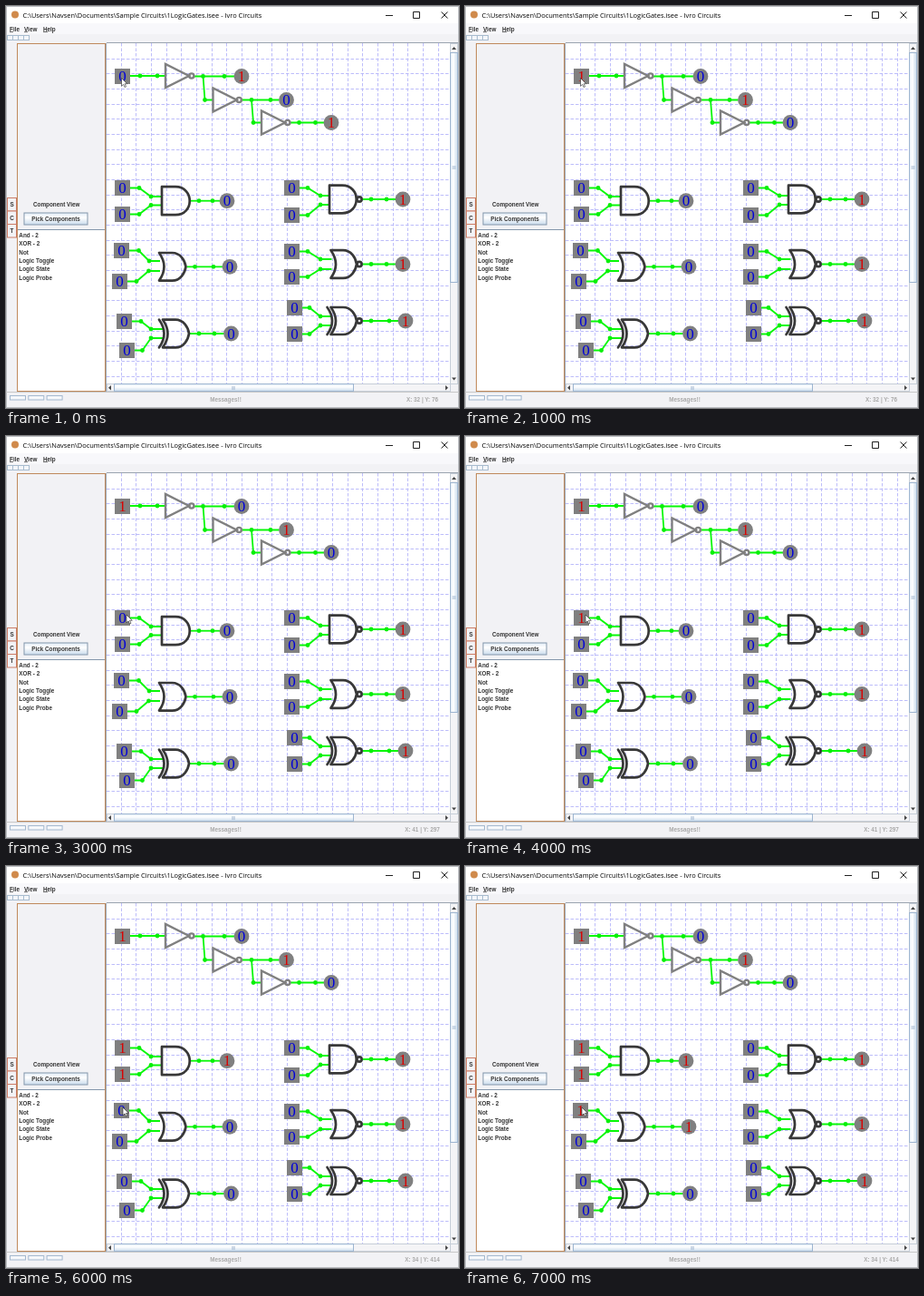
Animation of 500x443 px, one loop 8 s. Source, as an HTML page:

```html
<!DOCTYPE html>
<html lang="en">
<head>
<meta charset="utf-8">
<title>Logic gates</title>
<style>
html, body { margin: 0; width: 100%; height: 100%; overflow: hidden; background: #fff; }
svg { display: block; width: 100vw; height: 100vh; }
text { white-space: pre; }
.ui { font: bold 6.35px "Liberation Sans", Arial, sans-serif; fill: #333; }
.title { font: 7.45px "Open Sans", sans-serif; fill: #000; }
.dim { fill: #a9a9a9; text-anchor: middle; }
.mid { text-anchor: middle; }
.bit { font: 17px "Liberation Serif", "Times New Roman", serif; text-anchor: middle; }
.wire { fill: none; stroke: #08f808; stroke-width: 1.8; }
.dot { fill: #08f008; }
.gate { fill: none; stroke: #383838; stroke-width: 2.7; stroke-linejoin: round; stroke-linecap: round; }
.not { fill: none; stroke: #808080; stroke-width: 2.4; }
</style>
</head>
<body>
<svg id="stage" viewBox="0 0 500 443" preserveAspectRatio="none"></svg>
<script>
const stage = document.getElementById('stage');
const PANEL = '#f2f2f5';

function add(tag, attrs, label) {
  const el = document.createElementNS('http://www.w3.org/2000/svg', tag);
  for (const key in attrs) el.setAttribute(key, attrs[key]);
  if (label !== undefined) el.textContent = label;
  stage.appendChild(el);
  return el;
}
const rect = (x, y, width, height, fill, stroke = 'none') =>
  add('rect', { x, y, width, height, fill, stroke });
const path = (d, attrs) => add('path', { d, ...attrs });
const text = (x, y, label, cls = 'ui') => add('text', { x, y, class: cls }, label);
const dot = (x, y) => add('circle', { cx: x, cy: y, r: 2.4, class: 'dot' });
const bubble = (x, y, cls) => add('circle', { cx: x, cy: y, r: 2.6, class: cls });

// Window frame, title and menu
function drawWindow() {
  rect(0, 0, 500, 443, PANEL);
  rect(0, 0, 500, 19, '#fff');
  add('circle', { cx: 10, cy: 9.5, r: 4, fill: '#d08a4c' });
  text(18.5, 12.6, 'C:\\Users\\Navsen\\Documents\\Sample Circuits\\1LogicGates.isee - Ivro Circuits', 'title');
  path('M419 10.5h8M449.5 6.5h7v7h-7zM480.5 6.5l7 7M487.5 6.5l-7 7',
    { fill: 'none', stroke: '#222', 'stroke-width': 1 });

  rect(0, 19, 500, 12, '#f8f8fb');
  [['File', 4, 4], ['View', 20, 4], ['Help', 41, 5]].forEach(([name, x, w]) => {
    text(x, 27.6, name);
    rect(x, 28.4, w, 0.7, '#333');
  });
  for (let i = 0; i < 4; i++) rect(1.5 + i * 6, 32.5, 6, 5, '#f4f6fa', '#a8bccf');
  path('M0 .5H500M.5 0V443M499.5 0V443M0 442.5H500', { stroke: '#b9bcc0', fill: 'none' });
}

function drawSidebar() {
  ['S', 'C', 'T'].forEach((name, i) => {
    const y = 211.5 + i * 14.5;
    rect(1.5, y, 10, 14.5, PANEL, '#cc7c66');
    text(6.5, y + 9.5, name, 'ui mid');
  });
  rect(12.5, 41.5, 97, 383, PANEL, '#c08a5c');
  text(55.7, 220.8, 'Component View', 'ui mid');
  rect(20, 228, 70, 13, 'url(#metal)', '#8497ab');
  text(55, 237, 'Pick Components', 'ui mid');
  rect(13, 247, 96, 177, '#fff');
  path('M13 246.5H109', { stroke: '#8497ab' });
  ['And - 2', 'XOR - 2', 'Not', 'Logic Toggle', 'Logic State', 'Logic Probe']
    .forEach((name, i) => text(14.3, 254.7 + i * 9.4, name));
}

function drawCanvas() {
  rect(111, 41, 379, 375, '#fff');
  const step = 16.67;
  let grid = '';
  for (let x = 110 + step; x < 490; x += step) grid += `M${Math.round(x) + 0.5} 41V416`;
  for (let y = 41 + step; y < 416; y += step) grid += `M111 ${Math.round(y) + 0.5}H490`;
  path(grid, { fill: 'none', stroke: '#b6b6fa', 'stroke-width': 0.9, 'stroke-dasharray': '3.5 2' });
  path('M110.5 41V425M111 40.5H499', { stroke: '#9aa4b0', fill: 'none' });

  rect(490.5, 41.5, 8, 375, '#f4f4f6', '#c6ced8');
  rect(490.5, 51.5, 8, 253, 'url(#metalX)', '#9db5d0');
  rect(111.5, 416.5, 379, 8, '#f4f4f6', '#c6ced8');
  rect(119.5, 416.5, 264, 8, 'url(#metal)', '#9db5d0');
  path('M492 48l2.5-3 2.5 3zM492 409.5l2.5 3 2.5-3zM116 418l-3 2.7 3 2.7zM485 418l3 2.7-3 2.7z',
    { fill: '#444' });
  path('M492.5 177h4M492.5 179h4M250 419v4M252 419v4', { stroke: '#8ba5c4', 'stroke-width': 0.8 });
}

function drawStatus() {
  path('M0 425.5H500', { stroke: '#c8c8c8' });
  for (let i = 0; i < 3; i++) rect(4.5 + i * 20.3, 429.5, 17, 4.5, '#f6f8fb', '#a3b8cf');
  text(242.5, 436.3, 'Messages!!', 'ui dim');
}

// Circuit parts
const bits = [];
function bit(x, y, read, round) {
  if (round) add('circle', { cx: x, cy: y, r: 8.4, fill: '#808080' });
  else rect(x - 8.5, y - 8.5, 17, 17, '#808080');
  bits.push({ el: text(x, y + 5.7, '0', 'bit'), read });
}

function wire(...pts) {
  path('M' + pts.map(p => p.join(' ')).join('L'), { class: 'wire' });
}

// Output lead with two joints and a probe
function lead(from, y, a, b, probe, read) {
  wire([from, y], [probe - 8, y]);
  dot(a, y);
  dot(b, y);
  bit(probe, y, read, true);
}

function inverter(x, y) {
  path(`M${x} ${y - 13}V${y + 13}L${x + 26} ${y}Z`, { class: 'not' });
  bubble(x + 28.8, y, 'not');
}

// Blunt nose for AND, slightly pointed with a curved back for OR and XOR
function body(kind, x, y, r, h) {
  const top = y - h, low = y + h;
  if (kind === 'and') {
    path(`M${x} ${top}H${r - 16}C${r + 5} ${top} ${r + 5} ${low} ${r - 16} ${low}H${x}Z`, { class: 'gate' });
    return;
  }
  const back = `q11 ${-h} 0 ${-2 * h}`;
  path(`M${x} ${top}H${r - 15}C${r - 6} ${top} ${r - 1} ${y - 7} ${r} ${y}` +
    `C${r - 1} ${y + 7} ${r - 6} ${low} ${r - 15} ${low}H${x}${back}`, { class: 'gate' });
  if (kind === 'xor') path(`M${x - 4} ${low}${back}`, { class: 'gate' });
}

// ins: two rows of [box x, box y, joint x, joint x, joint y]
function gate({ kind, x, y, r, h, ins, out, inv, a, b, read }) {
  ins.forEach(([bx, by, j1, j2, jy], i) => {
    wire([bx + 8, by], [j1, by], [j2, jy], [x + (kind === 'or' ? 1 : 0), jy]);
    dot(j1, by);
    dot(j2, jy);
    bit(bx, by, i ? b : a);
  });
  lead(r + (inv ? 5 : 1), y, out[0], out[1], out[2], read);
  body(kind, x, y, r, h);
  if (inv) bubble(r + 3, y, 'gate');
}

function drawCircuit() {
  wire([137, 77], [176, 77]);
  dot(148, 77);
  dot(167, 77);
  wire([217.5, 77], [219.5, 103.5], [228, 103.5]);
  wire([271, 103.5], [273, 128.5], [282, 128.5]);
  dot(219.5, 103.5);
  dot(273, 128.5);
  bit(128.5, 77.5, s => s.a);
  lead(207, 77.5, 217.5, 241, 260, s => !s.a);
  lead(260, 103.5, 271, 292, 309.5, s => s.a);
  lead(313, 128.5, 323.5, 341.5, 359, s => !s.a);
  inverter(176, 77);
  inverter(228.5, 103.5);
  inverter(282, 128.5);

  const low = () => false, high = () => true;
  gate({ kind: 'and', x: 172, y: 214.7, r: 203, h: 15.5, out: [213, 228, 244],
    ins: [[128.5, 200.5, 147, 160, 210], [128.5, 229.5, 147, 160, 219.5]],
    a: s => s.b, b: s => s.c, read: s => s.b && s.c });
  gate({ kind: 'and', x: 357, y: 213, r: 387, h: 15.3, inv: true, out: [403, 420, 438],
    ins: [[315.5, 200.5, 333, 347, 209], [315.5, 230.5, 333, 347, 219]],
    a: low, b: low, read: high });
  gate({ kind: 'or', x: 169, y: 287.3, r: 198.5, h: 15.3, out: [208.5, 229, 247],
    ins: [[127.5, 269.5, 146.5, 158, 281], [125.5, 303.5, 144, 157.5, 292]],
    a: s => s.d, b: low, read: s => s.d });
  gate({ kind: 'or', x: 358.5, y: 284.5, r: 387, h: 15.3, inv: true, out: [403, 420, 438],
    ins: [[315.5, 270.5, 333, 347, 279], [315.5, 298.5, 333, 347, 290]],
    a: low, b: low, read: high });
  gate({ kind: 'xor', x: 173, y: 361, r: 202, h: 15.3, out: [213, 230, 248.5],
    ins: [[130.5, 347.5, 149, 160, 356], [133.5, 379.5, 150.5, 160, 366]],
    a: low, b: low, read: low });
  gate({ kind: 'xor', x: 358.5, y: 347, r: 387, h: 15, inv: true, out: [403, 423, 441],
    ins: [[318.5, 332.5, 335, 347, 342], [318.5, 361.5, 335, 347, 352]],
    a: low, b: low, read: high });
}

add('defs', {}).innerHTML = ['metal', 'metalX'].map((id, i) =>
  `<linearGradient id="${id}" x2="${i}" y2="${1 - i}"><stop stop-color="#e3edf7"/>
   <stop offset=".4" stop-color="#fff"/><stop offset="1" stop-color="#c9dbec"/></linearGradient>`).join('');
drawWindow();
drawSidebar();
drawCanvas();
drawStatus();
drawCircuit();
const coords = text(459.5, 436.3, '', 'ui dim');
const cursor = path('M0 0V8.8L2.1 6.9 3.5 10 5 9.3 3.6 6.3H6.3Z',
  { fill: '#fff', stroke: '#222', 'stroke-width': 0.6 });

// Pointer stops: second, x, y, readout
const stops = [
  [0, 127.5, 79.5, 'X: 32 | Y: 76'],
  [3, 133, 197, 'X: 41 | Y: 297'],
  [5, 130.5, 228.5, 'X: 37 | Y: 340'],
  [6, 129, 266, 'X: 34 | Y: 414']
];

function render(ms) {
  const sec = Math.floor(ms % 8000 / 1000);
  const state = { a: sec === 1 || sec >= 3, b: sec >= 4, c: sec >= 5, d: sec >= 7 };
  for (const { el, read } of bits) {
    const on = read(state);
    el.textContent = on ? '1' : '0';
    el.setAttribute('fill', on ? '#d80000' : '#0000d8');
  }
  const [, x, y, label] = stops.filter(stop => stop[0] <= sec).pop();
  cursor.setAttribute('transform', `translate(${x} ${y})`);
  coords.textContent = label;
}

const start = performance.now();
function tick() {
  render(performance.now() - start);
  requestAnimationFrame(tick);
}
tick();
</script>
</body>
</html>
```
